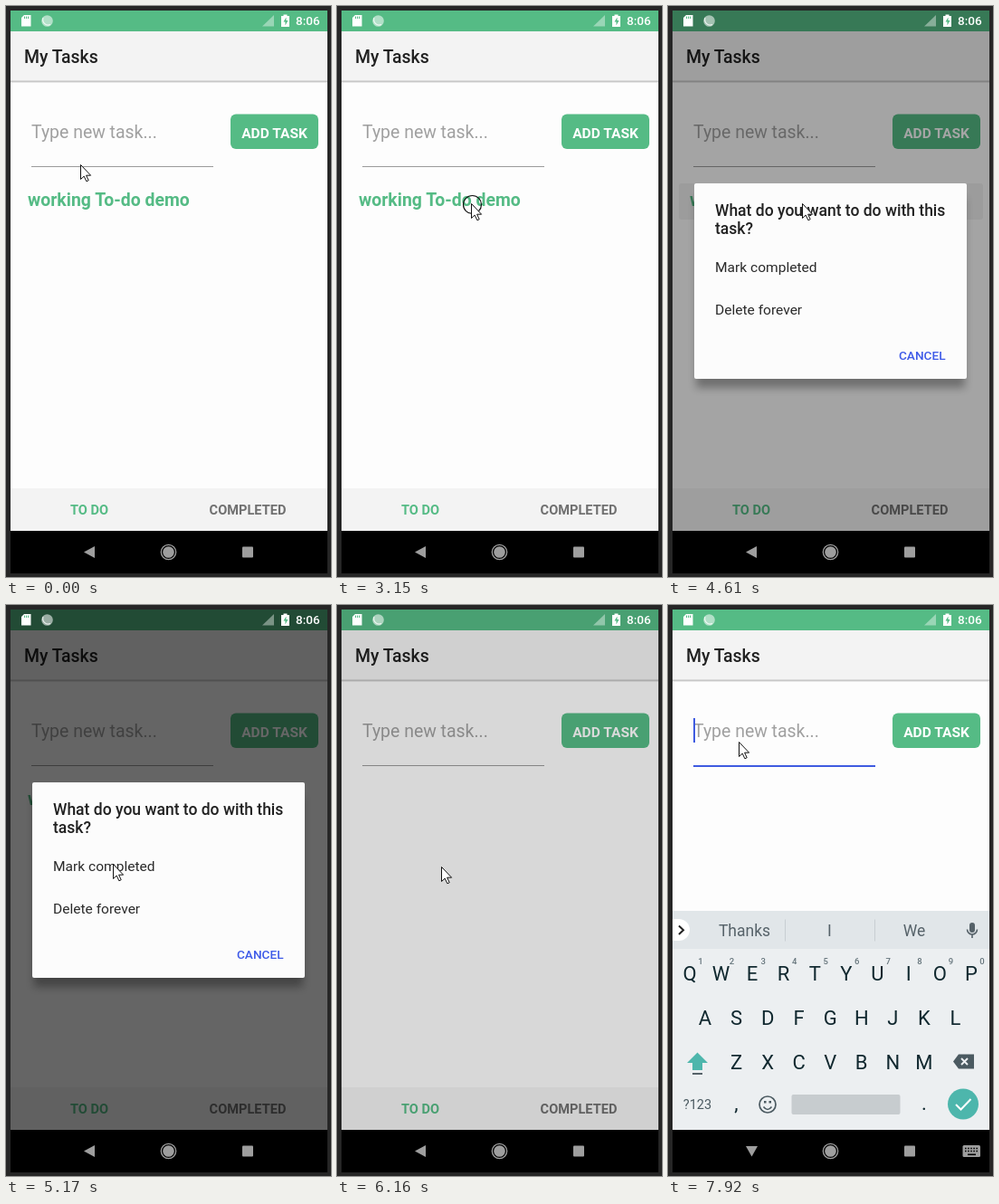
An HTML page that plays this animation: 359x631 px, repeating every 8 s.

```html
<!DOCTYPE html>
<html lang="en">
<head>
<meta charset="utf-8">
<title>My Tasks</title>
<style>
html, body { margin: 0; width: 100%; height: 100%; overflow: hidden; background: #262626; }
svg { display: block; font-family: Roboto, sans-serif; }
.mid { text-anchor: middle; }
.medium { font-weight: 500; }
.bold { font-weight: 700; }
.line { fill: none; stroke-width: 2; }
</style>
</head>
<body>
<svg width="359" height="631" viewBox="0 0 359 631">
  <defs>
    <clipPath id="app"><rect x="5" y="5" width="350" height="575"/></clipPath>
    <filter id="blur" x="-20%" y="-20%" width="140%" height="140%"><feGaussianBlur stdDeviation="5"/></filter>
  </defs>
  <rect width="359" height="631" fill="#262626"/>
  <rect x="5" y="5" width="350" height="622" fill="#fdfdfd"/>

  <g id="screen">
    <rect x="5" y="5" width="350" height="23" fill="#55bb85"/>
    <rect x="5" y="28" width="350" height="55" fill="#f3f3f3"/>
    <rect x="5" y="82" width="350" height="1" fill="#dcdcdc"/>
    <rect x="5" y="83" width="350" height="1" fill="#c8c8c8"/>
    <rect x="5" y="84" width="350" height="1" fill="#e8e8e8"/>
    <text x="20" y="63" class="medium" font-size="19.44" fill="#212121">My Tasks</text>
    <text x="28" y="146" font-size="19.44" fill="#a0a0a0">Type new task...</text>
    <rect id="underline" x="28" y="177" width="201"/>
    <rect id="caret" x="28" y="125" width="2" height="27" fill="#3f5be0"/>
    <rect x="248" y="119.500" width="97" height="38.500" rx="6" fill="#55bb85"/>
    <text x="296.500" y="146" class="mid bold" font-size="15.55" fill="#fff">ADD TASK</text>
    <rect id="pressed" x="12" y="196" width="336" height="40" rx="3" opacity=".05"/>
    <text id="task" x="24" y="220.500" class="bold" font-size="19.44" fill="#55bb85">working To-do demo</text>
    <rect x="5" y="533" width="350" height="47" fill="#f3f3f3"/>
    <text x="92" y="562" class="mid bold" font-size="14.6" fill="#55bb85">TO DO</text>
    <text x="267" y="562" class="mid bold" font-size="14.6" fill="#707070">COMPLETED</text>
  </g>

  <rect id="dim" x="5" y="5" width="350" height="575"/>

  <g fill="#fff">
    <path d="M20 10H27.500V22.500H17V13Z"/>
    <path d="M20.500 11.500v2.500m2-2.500v2.500m2-2.500v2.500" stroke="#55bb85"/>
    <circle cx="45.500" cy="16.500" r="6.300" opacity=".55"/>
    <path d="M41 13a6 6 0 0 0 8 7.500" class="line" stroke="#fff" style="stroke-width:1.200" opacity=".8"/>
    <path d="M296 10V22.500H283Z" opacity=".4"/>
    <path d="M306.500 9.500h4v1.500h2.500v12h-9v-12h2.500Z"/>
    <path d="M309.500 12.500l-3 5h2v4l3-5.500h-2Z" fill="#55bb85"/>
    <text x="320" y="21" class="medium" font-size="13.6">8:06</text>
  </g>

  <g id="dialog">
    <rect x="31" y="212" width="297" height="210" opacity=".32" filter="url(#blur)"/>
    <rect x="29" y="196" width="301" height="216" rx="2" fill="#fcfcfc"/>
    <rect id="choice" x="29" y="265" width="301" height="45" opacity=".035"/>
    <g class="medium" font-size="17.5" fill="#212121">
      <text x="52" y="232">What do you want to do with this</text>
      <text x="52" y="252">task?</text>
    </g>
    <g font-size="15.55" fill="#2a2a2a">
      <text x="52" y="294">Mark completed</text>
      <text x="52" y="341">Delete forever</text>
    </g>
    <text x="255" y="390.500" class="medium" font-size="13.6" fill="#3f5be8">CANCEL</text>
  </g>

  <g clip-path="url(#app)"><g id="keyboard">
    <rect x="5" y="338" width="350" height="42" fill="#e1e6e9"/>
    <rect x="5" y="380" width="350" height="260" fill="#eceff1"/>
    <path d="M5 347h7a12 12 0 0 1 0 24h-7Z" fill="#fff"/>
    <path d="M12 354.500l5 4.700l-5 4.700" class="line" stroke="#222"/>
    <path d="M129.500 347.500v24m99-24v24" stroke="#c8ced2"/>
    <g class="mid" font-size="17.5" fill="#566269">
      <text x="84.500" y="366">Thanks</text><text x="178.500" y="366">I</text><text x="272" y="366">We</text>
    </g>
    <rect x="333" y="351" width="6" height="11" rx="3" fill="#566269"/>
    <path d="M330.500 358.500a5.500 5.500 0 0 0 11 0M336 364v4" class="line" stroke="#566269" style="stroke-width:1.600"/>
    <g id="keys" class="mid" fill="#10282f"></g>
    <path d="M32.500 494.500l11.500 11.500h-6v8h-11v-8h-6Z" fill="#4db6ac"/>
    <rect x="27" y="517" width="11" height="2" fill="#566269"/>
    <path d="M321 496.500h17v16h-17l-6-8Z" fill="#4b5a61"/>
    <path d="M324 501l7 7m0-7l-7 7" class="line" stroke="#eceff1"/>
    <text x="32.500" y="557" class="mid" font-size="14.500" fill="#4b5a61">?123</text>
    <circle cx="110" cy="552" r="9" class="line" stroke="#4b5a61" style="stroke-width:1.700"/>
    <path d="M105.500 554.500q4.500 6 9 0" class="line" stroke="#4b5a61" style="stroke-width:1.600"/>
    <path d="M106 548h2.500v2.500h-2.500zm5.500 0h2.500v2.500h-2.500z" fill="#4b5a61"/>
    <rect x="136.500" y="541" width="120" height="22" rx="2" fill="#c7cccf"/>
    <circle cx="326" cy="551.500" r="17" fill="#4db6ac"/>
    <path d="M318 552l5.500 5.500l11-11.500" class="line" stroke="#fff"/>
  </g></g>

  <rect x="5" y="580" width="350" height="47"/>
  <g fill="#9e9e9e">
    <path id="back"/>
    <circle cx="179.500" cy="603.500" r="6.300"/>
    <circle cx="179.500" cy="603.500" r="8.200" class="line" stroke="#9e9e9e" style="stroke-width:1.300"/>
    <rect x="261" y="597.500" width="12" height="12" rx="1"/>
    <g id="imeButton">
      <rect x="325.500" y="597" width="19.500" height="13" rx="1.500"/>
      <path d="M328 600.500h15m-15 3h15" stroke="#000" stroke-width="1.600" stroke-dasharray="1.600 1.500"/>
      <path d="M331 607.300h9" stroke="#000" stroke-width="1.600"/>
    </g>
  </g>

  <circle id="click" r="10" class="line" stroke="#111" style="stroke-width:1.200"/>
  <path id="pointer" d="M.5.500V16.500L4.200 13.100L6.900 18.800L9.200 17.700L6.600 12.200H11.600Z" fill="#fff" stroke="#111"/>
</svg>
<script>
const $ = id => document.getElementById(id);
const set = (id, attrs) => { for (const k in attrs) $(id).setAttribute(k, attrs[k]); };
const show = (id, on) => { $(id).style.display = on ? "" : "none"; };
const clamp = v => Math.min(1, Math.max(0, v));

const key = (label, x, y, size = 22, cls = "") =>
  `<text x="${x}" y="${y}" font-size="${size}" class="${cls}">${label}</text>`;
const row = (letters, x, y) => [...letters].map((c, i) => key(c, x + i * 34.55, y)).join("");
$("keys").innerHTML = row("QWERTYUIOP", 24, 415) + row("ASDFGHJKL", 41, 464) + row("ZXCVBNM", 75.5, 513)
  + key(",", 75.5, 558) + key(".", 283, 558)
  + `<g fill="#66757c">${[..."1234567890"].map((c, i) => key(c, 36 + i * 34.55, 397, 9.5, "medium")).join("")}</g>`;

// Pointer tip: time, x, y
const path = [
  [0, 82, 175], [180, 82, 175], [480, 105, 161], [840, 79, 137], [1180, 79, 137], [1270, 75, 141],
  [2130, 75, 141], [2960, 140, 221], [3090, 148, 218], [4920, 148, 218], [5230, 115, 293],
  [5400, 115, 293], [5410, 115, 294], [5560, 115, 294], [5690, 115, 289],
  [6350, 115, 289], [6780, 78, 151], [8000, 78, 151]
];
// Clicks: start, end, x, y
const clicks = [[3150, 4310, 149.5, 219.5], [5700, 5860, 116, 290], [6790, 6900, 79, 152]];

// Piecewise track with smooth or linear segments
function track(points, t, smooth) {
  const i = Math.max(1, points.findIndex(p => p[0] > t));
  const a = points[i - 1], b = points[i];
  let u = clamp((t - a[0]) / (b[0] - a[0]));
  if (smooth) u = u * u * (3 - 2 * u);
  return a.slice(1).map((v, k) => v + (b[k + 1] - v) * u);
}

function draw(t) {
  const [x, y] = track(path, t, true);
  set("pointer", { transform: `translate(${Math.round(x)} ${Math.round(y)})` });

  const press = clicks.find(c => t >= c[0] && t < c[1]);
  show("click", press);
  if (press) set("click", { cx: press[2], cy: press[3] });

  const [dim] = track([[0, 0], [4609, 0], [4610, .35], [4730, .6], [6025, .6], [6205, 0], [8001, 0]], t);
  set("dim", { opacity: dim });
  show("dialog", t >= 4610 && t < 6130);
  set("dialog", { opacity: 1 - clamp((t - 6010) / 95) });
  show("choice", t >= 6035);
  show("pressed", t >= 4610 && t < 4670);
  show("task", t < 6040);

  const focused = t >= 6900;
  set("underline", { height: focused ? 2 : 1, fill: focused ? "#3f5be0" : "#9b9b9b" });
  show("caret", focused && Math.floor((t - 6900) / 500) % 2 === 0);
  show("imeButton", focused);
  set("back", { d: focused ? "M86 598H99L92.500 609.500Z" : "M86 603.500L98 597V610Z" });

  const rise = 1 - (1 - clamp((t - 7180) / 220)) ** 2;
  show("keyboard", t >= 7220);
  set("keyboard", { opacity: rise, transform: `translate(0 ${(1 - rise) * 50})` });
}

function frame() {
  draw(performance.now() % 8000);
  requestAnimationFrame(frame);
}
frame();
</script>
</body>
</html>
```
